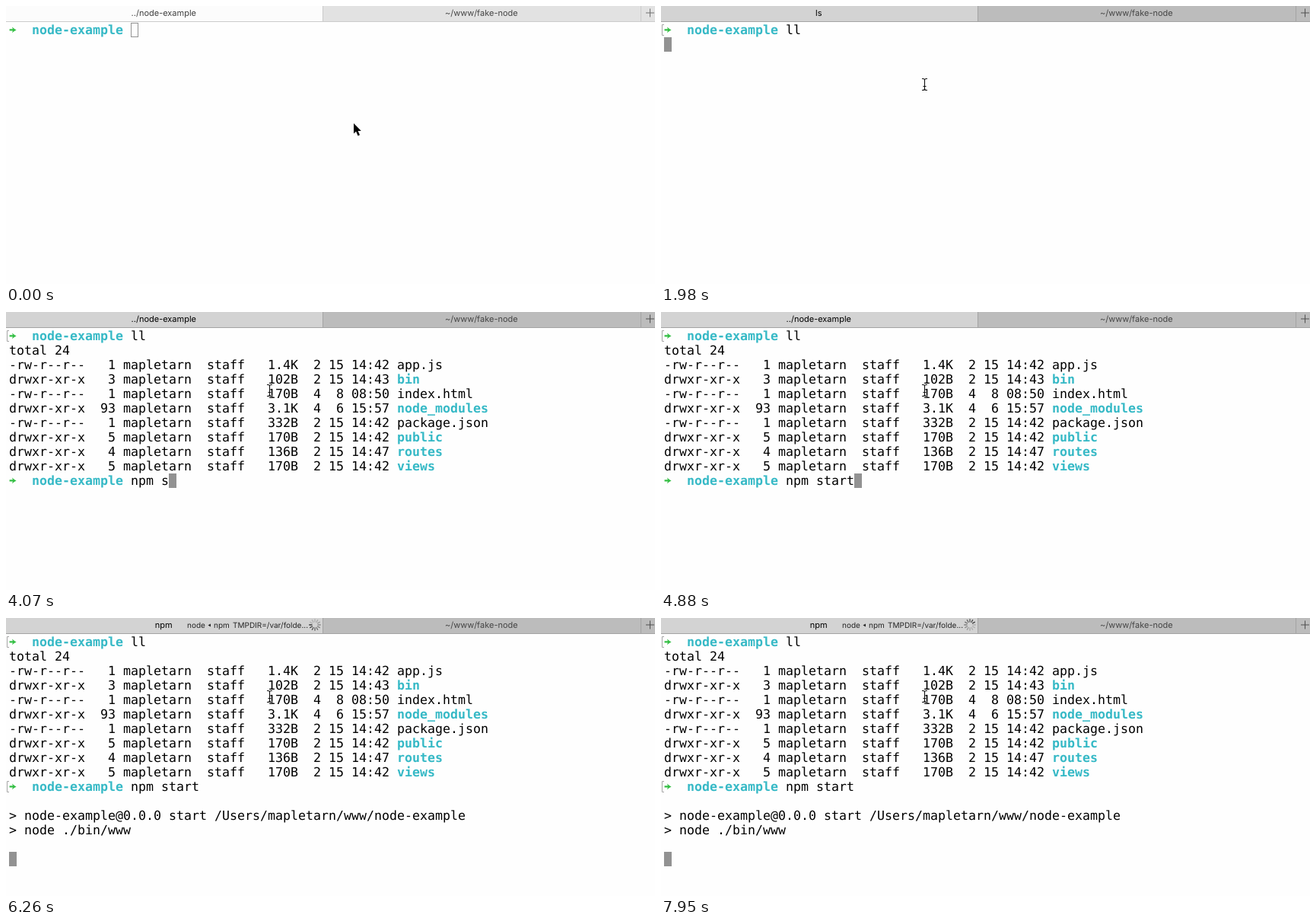
An HTML page for the animation above (8000 ms loop, 853 by 365 pixels).

```html
<!DOCTYPE html>
<html lang="en">
<head>
<meta charset="utf-8">
<title>Terminal session</title>
<style>
  html, body { margin: 0; width: 100%; height: 100%; overflow: hidden; background: #fefefe; }
  svg { display: block; width: 853px; height: 365px; }
  text { white-space: pre; text-rendering: geometricPrecision; }
  .mono { font: 16.61px "DejaVu Sans Mono", monospace; fill: #000; }
  .dir { font-weight: bold; fill: #36b9c6; }
  .tab { font: 11px Inter, "Open Sans", sans-serif; text-anchor: middle; }
  .tail { font: 10px Inter, "Open Sans", sans-serif; fill: #262626; }
</style>
</head>
<body>
<svg id="stage" viewBox="0 0 853 365" xmlns="http://www.w3.org/2000/svg"></svg>
<script>
const LOOP = 8000, COL = 10, ROW = 19, LEFT = 4, TOP = 22;
const USER = "mapletarn";
const stage = document.getElementById("stage");

function add(parent, tag, attrs = {}, text) {
  const el = document.createElementNS("http://www.w3.org/2000/svg", tag);
  set(el, attrs);
  if (text !== undefined) el.textContent = text;
  parent.appendChild(el);
  return el;
}
function set(el, attrs) {
  for (const k in attrs) el.setAttribute(k, attrs[k]);
}
function show(el, on) {
  el.setAttribute("visibility", on ? "visible" : "hidden");
}
const group = () => add(stage, "g");

// Writes text on the character grid, one element per word.
function write(parent, row, col, text, cls = "") {
  for (const m of text.matchAll(/\S+/g)) {
    add(parent, "text", {
      class: "mono " + cls, x: LEFT + (col + m.index) * COL, y: TOP + row * ROW + 15
    }, m[0]);
  }
}

function prompt(parent, row) {
  const y = TOP + row * ROW;
  add(parent, "path", {
    d: "M4.6 8.3H8.9L8 5.6Q10.3 7.9 13.6 9.4Q10.3 10.9 8 13.2L8.9 10.5H4.6Z",
    transform: `translate(0 ${y})`, fill: "#35bf45"
  });
  write(parent, row, 3, "node-example", "dir");
}
function bracket(row) {
  const y = TOP + row * ROW;
  return add(stage, "path", {
    d: `M4 ${y + 2.5}H1.5V${y + 16.5}H4`, fill: "none", stroke: "#a6a6a6"
  });
}

// Tab bar
const activeTab = add(stage, "rect", { width: 416, height: 20 });
const otherTab = add(stage, "rect", { x: 416, width: 437, height: 20 });
const edges = add(stage, "path", { d: "M0 20.5H853M416.5 0V20M834.5 0V20", fill: "none" });
const plus = add(stage, "path", { d: "M841 9H852M846.5 3.5V14.5", fill: "none" });
const title = add(stage, "text", { class: "tab", x: 207.3, y: 13 });
const otherTitle = add(stage, "text", { class: "tab", x: 624.8, y: 13, fill: "#454545" }, "~/www/fake-node");

// Running process and its spinner
const busy = group();
[[238, "node"], [273, "npm"], [298, "TMPDIR=/var/folde..."]].forEach(([x, s]) =>
  add(busy, "text", { class: "tail", x, y: 13 }, s));
add(busy, "path", { d: "M265.5 9.5L269 7.5V11.5Z", fill: "#262626" });
const spokes = Array.from({ length: 12 }, (_, i) => add(busy, "path", {
  d: "M0 -4V-7.3", transform: `translate(406 9) rotate(${i * 30})`,
  stroke: "#333", "stroke-width": 1.3, "stroke-linecap": "round"
}));
const spins = [[5690, 6450, 13], [6540, 7330, 15], [7390, 7950, 11]];

// Terminal contents
const first = group();
prompt(first, 0);
const firstMark = bracket(0);

const files = [
  ["-rw-r--r--", 1, "1.4K", 2, 15, "14:42", "app.js"],
  ["drwxr-xr-x", 3, "102B", 2, 15, "14:43", "bin"],
  ["-rw-r--r--", 1, "170B", 4, 8, "08:50", "index.html"],
  ["drwxr-xr-x", 93, "3.1K", 4, 6, "15:57", "node_modules"],
  ["-rw-r--r--", 1, "332B", 2, 15, "14:42", "package.json"],
  ["drwxr-xr-x", 5, "170B", 2, 15, "14:42", "public"],
  ["drwxr-xr-x", 4, "136B", 2, 15, "14:47", "routes"],
  ["drwxr-xr-x", 5, "170B", 2, 15, "14:42", "views"]
];
const listing = group();
write(listing, 1, 0, "total 24");
files.forEach(([mode, links, size, month, day, time, name], i) => {
  const head = mode + String(links).padStart(4);
  const date = `${month} ${String(day).padStart(2)} ${time}`;
  write(listing, i + 2, 0, `${head} ${USER}  staff   ${size}  ${date}`);
  write(listing, i + 2, 51, name, mode[0] === "d" ? "dir" : "");
});
prompt(listing, 10);
const secondMark = bracket(10);

const output = group();
write(output, 12, 0, `> node-example@0.0.0 start /Users/${USER}/www/node-example`);
write(output, 13, 0, "> node ./bin/www");

// Typed commands: one key time per character
const commands = [
  { row: 0, text: "ll", keys: [1530, 1680] },
  { row: 10, text: "npm start", keys: [3090, 3330, 3540, 3840, 4070, 4310, 4490, 4640, 4880] }
];
for (const c of commands) {
  c.chars = [...c.text].map((ch, i) => {
    const g = group();
    write(g, c.row, 16 + i, ch);
    return g;
  });
}
const typed = (c, t) => c.keys.filter(k => t >= k).length;

const caret = add(stage, "rect");

// Mouse pointers
const arrow = add(stage, "path", {
  d: "M0 0V13.6L3.1 10.8L5.6 16.4L8 15.3L5.6 9.9H9.8Z",
  fill: "#000", stroke: "#fff", "stroke-width": 1.2, "paint-order": "stroke"
});
const beam = group();
const beamShape = "M343 95.5H344.5Q346.5 95.5 346.5 97.5Q346.5 95.5 348.5 95.5H350" +
  "M346.5 97V109M343 110.5H344.5Q346.5 110.5 346.5 108.5Q346.5 110.5 348.5 110.5H350M344.5 105.5H348.5";
add(beam, "path", { d: beamShape, fill: "none", stroke: "#fff", "stroke-width": 2.4, opacity: 0.6 });
add(beam, "path", { d: beamShape, fill: "none", stroke: "#111", "stroke-width": 1.1 });

function caretCell(t) {
  if (t >= 5540) return [15, 0];
  if (t >= 5210) return [11, 0];
  if (t >= 2010) return [10, 16 + typed(commands[1], t)];
  if (t >= 1980) return [1, 0];
  return [0, 16 + typed(commands[0], t)];
}

function spinStep(t) {
  return spins.reduce((sum, [from, to, n]) => t < from ? sum :
    sum + Math.min(n, 1 + Math.floor((t - from) / (to - from) * (n - 1))), 0) - 1;
}

function draw(t) {
  // The pointer moves in ten discrete steps, then the window gains focus.
  const step = t < 290 ? 0 : Math.min(10, 1 + Math.floor((t - 290) / 400 * 9));
  const focus = step >= 9;
  const p = Math.min(1, step / 8), ease = p * p * (3 - 2 * p);
  set(arrow, { transform: `translate(${457 - 110 * ease} ${154 - 51 * ease})` });
  show(arrow, step < 10);
  show(beam, step >= 10);

  set(activeTab, { fill: focus ? "#d3d3d3" : "#fcfcfc" });
  set(otherTab, { fill: focus ? "#bcbcbc" : "#e2e2e2" });
  set(edges, { stroke: focus ? "#a3a3a3" : "#cbcbcb" });
  set(plus, { stroke: focus ? "#505050" : "#707070" });
  set(title, { fill: focus ? "#000" : "#404040" });
  title.textContent = t >= 5210 ? "npm" : t >= 1980 && t < 2010 ? "ls" : "../node-example";

  show(firstMark, t >= 1980);
  show(listing, t >= 2010);
  show(secondMark, t >= 5210);
  show(output, t >= 5540);
  for (const c of commands) c.chars.forEach((g, i) => show(g, t >= c.keys[i]));

  const [row, col] = caretCell(t);
  const inset = focus ? 0 : 0.5;
  set(caret, {
    x: LEFT + col * COL + inset, y: TOP + row * ROW + inset,
    width: COL - 2 * inset, height: ROW - 2 * inset,
    fill: focus ? "#929292" : "none", stroke: focus ? "none" : "#929292"
  });

  show(busy, t >= 5690);
  const head = Math.max(0, spinStep(t));
  spokes.forEach((s, i) => {
    const age = (head - i + 120) % 12;
    set(s, { opacity: Math.max(0.22, 0.95 - age * 0.085).toFixed(3) });
  });
}

const start = performance.now();
function tick() {
  draw((performance.now() - start) % LOOP);
  requestAnimationFrame(tick);
}
tick();
</script>
</body>
</html>
```
